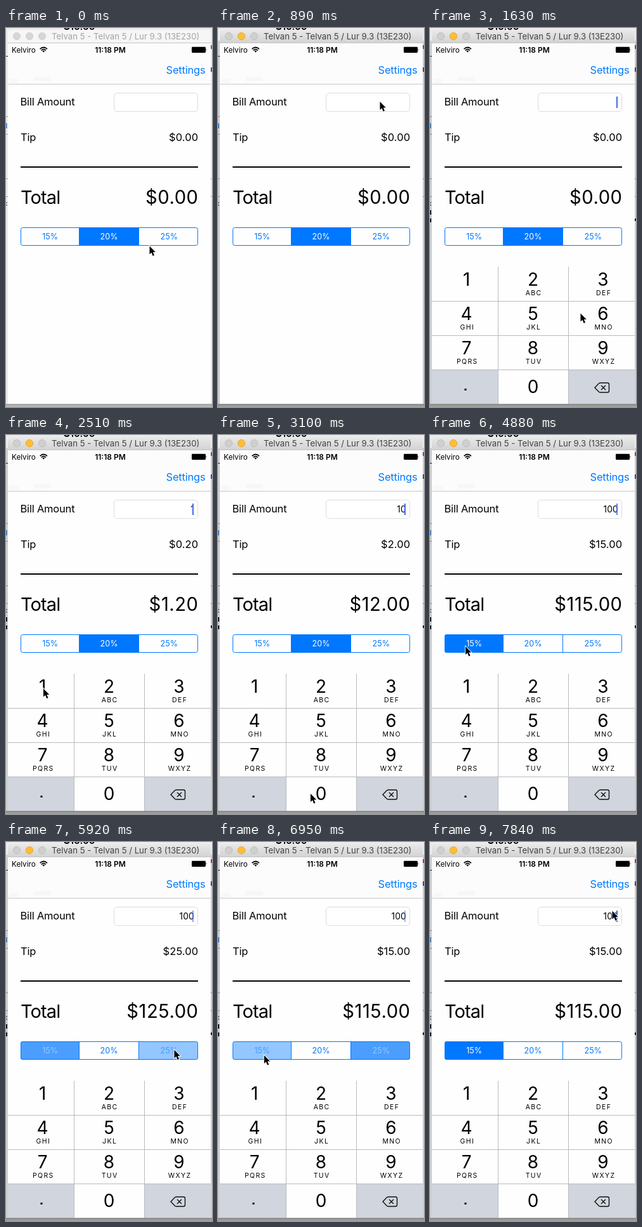
An HTML page for the animation above (7.99 s loop, 325 by 597 pixels).

```html
<!DOCTYPE html>
<html lang="en">
<head>
<meta charset="utf-8">
<title>Tip calculator</title>
<style>
  html, body { margin: 0; width: 100%; height: 100%; overflow: hidden; background: #e6e6e6; }
  svg { display: block; width: 325px; height: 597px; }
  text { font-family: Inter, "Liberation Sans", sans-serif; font-optical-sizing: none; white-space: pre; }
  .label { font-size: 16.5px; letter-spacing: -.2px; }
  .end { text-anchor: end; }
  .mid { text-anchor: middle; }
  .seg { font-size: 12.6px; text-anchor: middle; }
  .digit { font-size: 28px; text-anchor: middle; }
  .abc { font-size: 10.5px; letter-spacing: 1.4px; text-anchor: middle; }
</style>
</head>
<body>
<svg viewBox="0 0 325 597">
  <defs>
    <linearGradient id="bar" x2="0" y2="1">
      <stop stop-color="#e9e9e9"/><stop offset="1" stop-color="#d2d2d2"/>
    </linearGradient>
    <linearGradient id="shade" x2="0" y2="1">
      <stop stop-color="#000" stop-opacity=".32"/><stop offset="1" stop-color="#000" stop-opacity=".2"/>
    </linearGradient>
    <clipPath id="win"><path d="M3 24H323V592H3Z"/></clipPath>
    <clipPath id="pill"><rect x="23" y="314" width="280" height="29" rx="3.5"/></clipPath>
  </defs>

  <!-- desktop behind the window -->
  <rect width="325" height="597" fill="#ececec"/>
  <text x="91" y="3" font-size="15" font-weight="600">$10.00</text>
  <path d="M0 44.5H3" stroke="#222"/>
  <path d="M0 139.5H3M0 167.5H3M0 237.5H3M0 265.5H3M323 237.5H325M323 265.5H325" stroke="#999"/>
  <path d="M0 150V158" stroke="#2b7fd4" stroke-width="3"/>
  <path d="M324 27V33" stroke="#c33a9b" stroke-width="2"/>
  <path d="M324 62V69" stroke="#5a49b8" stroke-width="2"/>
  <path d="M1 274V280" stroke="#223" stroke-dasharray="2 2"/>
  <path id="code" d="M1 287V294M1 300V306M324 300V304" stroke="#223" stroke-width="2"/>
  <rect y="592" width="325" height="5" fill="url(#shade)"/>
  <g id="glow">
    <path d="M0 20H3V592H0ZM323 20H325V592H323Z" fill="#000" opacity=".12"/>
    <rect y="592" width="325" height="5" fill="#000" opacity=".14"/>
  </g>

  <!-- window frame -->
  <path id="head" d="M3 24V8Q3 3 8 3H318Q323 3 323 8V24Z"/>
  <path d="M3 23.5H323" stroke="#c4c4c4"/>
  <g id="lights" stroke-width=".8"><circle cx="17" cy="13" r="5.7"/><circle cx="37" cy="13" r="5.7"/><circle cx="57" cy="13" r="5.7"/></g>
  <text id="name" x="72" y="18" font-size="13.2">Telvan 5 - Telvan 5 / Lur 9.3 (13E230)</text>

  <!-- screen -->
  <rect x="3" y="24" width="320" height="568" fill="#fefefe"/>
  <rect x="3" y="24" width="320" height="64" fill="#fcfcfc"/>
  <path d="M44 77H71V84H44ZM5 80H20V87H5Z" fill="#f7f7f7"/>
  <path d="M3 88.5H323" stroke="#c8c8c8"/>
  <text x="9" y="38.5" font-size="11.7">Kelviro</text>
  <g fill="none" stroke="#000" stroke-width="1.7">
    <path d="M53.6 33.2Q59.3 27.8 65 33.2M55.7 35.4Q59.3 32 62.9 35.4"/>
    <path d="M57.4 36.4Q59.3 34.8 61.2 36.4L59.3 38.6Z" fill="#000" stroke="none"/>
  </g>
  <text class="mid" x="164.5" y="38.5" font-size="12" font-weight="600">11:18 PM</text>
  <rect x="293" y="29.7" width="22" height="9.2" rx="1.3"/>
  <path d="M315.7 32.5q1.8 1.7 0 3.5z"/>
  <text class="label end" x="314.5" y="72" fill="#007aff" letter-spacing="-.1">Settings</text>

  <text class="label" x="22.5" y="122">Bill Amount</text>
  <rect x="170.5" y="102.5" width="132" height="29" rx="4.5" fill="#fff" stroke="#dcdcdc"/>
  <text id="bill" class="end" x="297" y="122" font-size="13.8" letter-spacing=".2"></text>
  <rect id="caret" x="294" y="108" width="2" height="18" fill="#4169ec"/>
  <text class="label" x="23" y="177.5">Tip</text>
  <text id="tip" class="end" x="303.3" y="177.5" font-size="16.5" letter-spacing=".1"></text>
  <path d="M23 219H303" stroke="#000" stroke-width="2"/>
  <text x="23" y="276.5" font-size="29" letter-spacing="-.9">Total</text>
  <text id="total" class="end" x="303.6" y="276.5" font-size="29.2" letter-spacing=".55"></text>

  <g id="tabs" clip-path="url(#pill)"></g>
  <rect x="23.5" y="314.5" width="279" height="28" rx="3" fill="none" stroke="#0077ff"/>
  <path d="M115.5 314V343M209.5 314V343" stroke="#0077ff"/>
  <g id="tabText"></g>

  <g clip-path="url(#win)"><g id="pad"></g></g>

  <path id="arrow" d="M0 0V13L3 10.3L5.2 15.5L7.5 14.5L5.3 9.5H9.3Z" stroke="#fff" stroke-width="1.8" paint-order="stroke"/>
</svg>
<script>
const $ = id => document.getElementById(id);
const LOOP = 7990, STEP = 148;
const BLUE = [0, 119, 255];
const cols = [[3, 107, 57.6], [108, 218, 162.5], [219, 323, 273]];

function add(parent, tag, attrs, text) {
  const el = document.createElementNS("http://www.w3.org/2000/svg", tag);
  for (const key in attrs) el.setAttribute(key, attrs[key]);
  if (text) el.textContent = text;
  parent.append(el);
  return el;
}

function set(el, key, value) { el.setAttribute(key, value); }

// number pad
const pad = $("pad"), keys = {};
const letters = ["", "ABC", "DEF", "GHI", "JKL", "MNO", "PQRS", "TUV", "WXYZ"];
[1, 2, 3, 4, 5, 6, 7, 8, 9, ".", 0, "del"].forEach((key, i) => {
  const [x, right, mid] = cols[i % 3], y = 376 + 54 * Math.floor(i / 3);
  const side = key === "." || key === "del";
  keys[key] = add(pad, "rect", { x, y, width: right - x, height: 54, fill: side ? "#d1d5dd" : "#fefefe" });
  if (side) return;
  add(pad, "text", { class: "digit", x: mid, y: y + (i > 8 ? 37 : 30) }, String(key));
  if (letters[i]) add(pad, "text", { class: "abc", x: mid + 1.2, y: y + 45 }, letters[i]);
});
add(pad, "path", { d: "M107.5 376V592M218.5 376V592M3 430.5H323M3 484.5H323M3 538.5H323", stroke: "#b9bbc0" });
add(pad, "rect", { x: 54.5, y: 568, width: 3, height: 3 });
add(pad, "path", {
  d: "M260 566.5L266.5 559.8Q267.5 559 269 559H280Q282.5 559 282.5 561.5V571.5Q282.5 574 280 574H269Q267.5 574 266.5 573.2ZM270 563L277 570M277 563L270 570",
  fill: "none", stroke: "#111", "stroke-width": 1.4
});

// tip rates
const tabs = [[23, 115, 69.7], [115, 210, 162.5], [210, 303, 257.3]].map(([x, right, mid], i) => ({
  box: add($("tabs"), "rect", { x, y: 314, width: right - x, height: 29, fill: `rgb(${BLUE})` }),
  text: add($("tabText"), "text", { class: "seg", x: mid, y: 333 }, 15 + 5 * i + "%")
}));

// pointer stops: step, x, y
const stops = [
  [0, 226.5, 343.5], [6, 255.5, 116], [8, 255.5, 116], [11, 237.5, 449.5], [15, 59, 399.5], [17, 59, 399.5],
  [20, 146, 565], [25, 146, 565], [26, 139.5, 544], [30, 57, 333], [33, 56, 333], [38, 265.5, 327.5],
  [42, 265.5, 327.5], [46, 72, 337], [49, 75, 333], [50, 76, 332], [53, 287.5, 108.5]
];

// rate choices: step of the cross-fade, tab index
const picks = [[-9, 1], [31, 0], [40, 2], [47, 0]];
const presses = { 16: 1, 20: 0, 22: 0 };

function pointer(k) {
  const i = stops.findIndex(s => s[0] >= k);
  if (i < 1) return stops[i < 0 ? stops.length - 1 : 0].slice(1);
  const [ka, xa, ya] = stops[i - 1], [kb, xb, yb] = stops[i];
  const u = (k - ka) / (kb - ka), e = u * u * (3 - 2 * u);
  return [xa + (xb - xa) * e, ya + (yb - ya) * e];
}

function caretAlpha(k) {
  if (k < 8) return 0;
  if (k >= 16 && k <= 26) return 1;
  const p = (k * STEP + 150) % 1000;
  if (p < 200) return 1 - p / 200;
  return p < 500 ? 0 : Math.min(1, (p - 500) / 200);
}

function draw(ms) {
  const k = Math.min(53, Math.floor(ms / 147.8 + .05));
  const active = k >= 5;

  set($("head"), "fill", active ? "url(#bar)" : "#f6f6f6");
  set($("name"), "fill", active ? "#414141" : "#a3a3a3");
  [...$("lights").children].forEach((c, i) => {
    const lit = active && i === 1;
    set(c, "fill", lit ? "#fdbe34" : active ? "#cfcfcf" : "#d6d6d6");
    set(c, "stroke", lit ? "#e0a12c" : active ? "#b9b9b9" : "#cdcdcd");
  });
  set($("glow"), "opacity", active ? 1 : 0);
  set($("code"), "opacity", k >= 9 ? 1 : 0);

  const rise = Math.min(1, Math.max(0, (k - 8) / 2));
  set(pad, "transform", `translate(0 ${216 * (1 - rise) ** 2})`);
  set(pad, "opacity", rise ? 1 : 0);
  for (const d of [0, 1]) set(keys[d], "fill", presses[k] === d ? "#d1d5dd" : "#fefefe");

  const bill = k < 17 ? "" : k < 21 ? "1" : k < 23 ? "10" : "100";
  const n = picks.filter(p => p[0] <= k).length - 1;
  const [at, now] = picks[n];
  const tip = bill * (15 + 5 * now) / 100;
  $("bill").textContent = bill;
  $("tip").textContent = "$" + tip.toFixed(2);
  $("total").textContent = "$" + (+bill + tip).toFixed(2);
  set($("caret"), "opacity", caretAlpha(k));

  const fading = k === at;
  tabs.forEach((tab, i) => {
    let on = i === now ? 1 : 0;
    if (fading) on = i === now ? .42 : i === picks[n - 1][1] ? .7 : 0;
    set(tab.box, "opacity", on);
    set(tab.text, "fill", `rgb(${BLUE.map(c => Math.round(c + (255 - c) * on ** 1.5))})`);
  });

  const [x, y] = pointer(k);
  set($("arrow"), "transform", `translate(${x.toFixed(1)} ${y.toFixed(1)})`);
}

let start;
function tick(now) {
  start ??= now;
  draw((now - start) % LOOP);
  requestAnimationFrame(tick);
}
draw(0);
requestAnimationFrame(tick);
</script>
</body>
</html>
```
